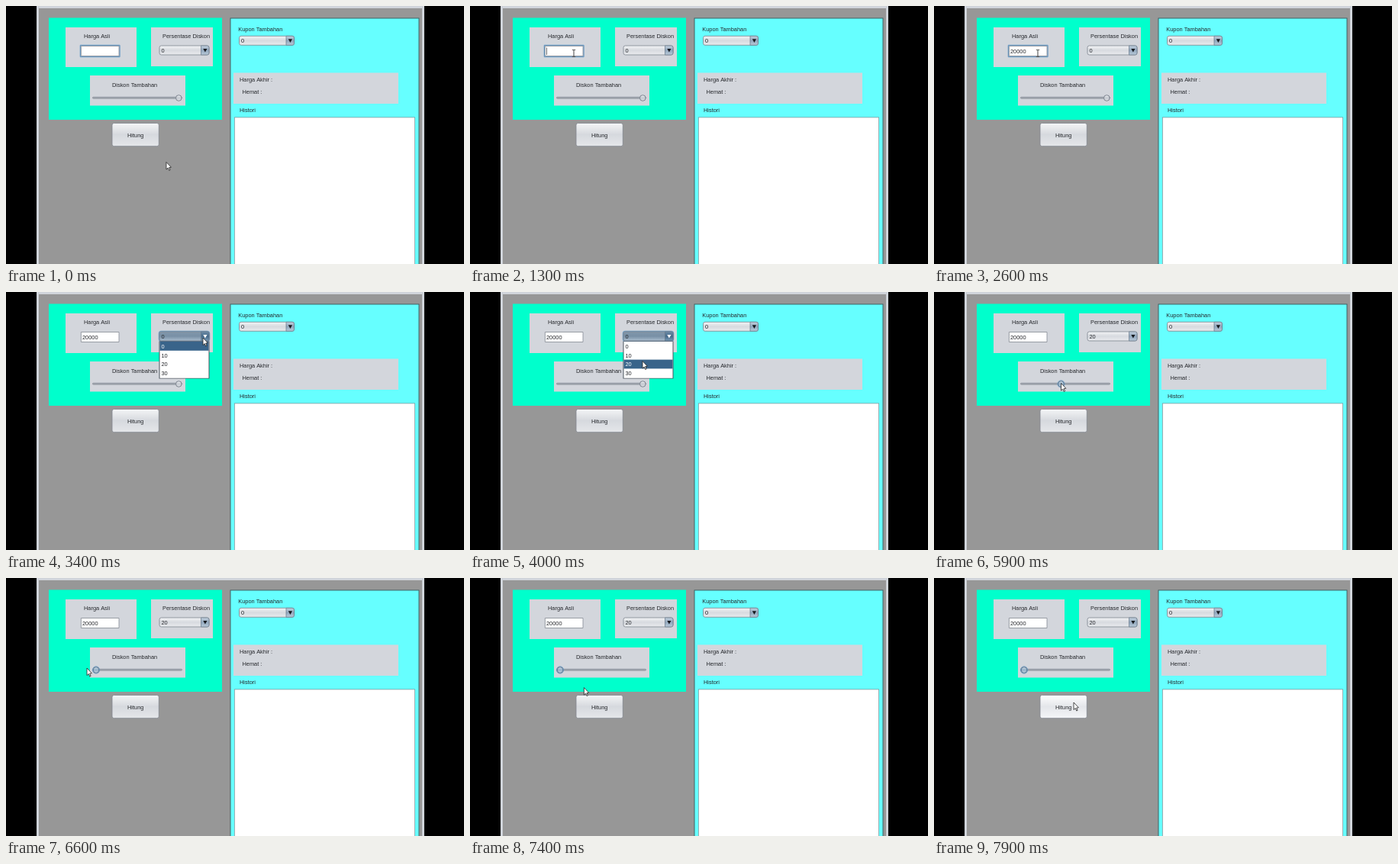
An HTML page with a canvas that plays this animation: 600x338 px, repeating every 8 s.

```html
<!DOCTYPE html>
<html lang="id">
<head>
<meta charset="utf-8">
<title>Kalkulator Diskon</title>
<style>
html, body { margin: 0; width: 100%; height: 100%; overflow: hidden; background: #000; }
canvas { display: block; }
</style>
</head>
<body>
<canvas id="stage" width="600" height="338"></canvas>
<script>
const ctx = document.getElementById('stage').getContext('2d');
const LOOP = 8000, PANEL = '#d3d6dc', INK = '#25272b', FOCUS = '#6c9cc4';

// Pointer path: [time, x, y]
const path = [
  [0, 210, 204.5], [100, 210, 204.5], [400, 156, 138], [700, 88, 64], [800, 109, 68],
  [900, 109, 68], [1200, 139, 62], [1300, 136, 62], [2700, 136, 62],
  [3100, 258, 60], [3600, 258, 60], [3900, 231, 100], [4000, 226, 90.5],
  [4500, 226, 90.5], [5000, 195, 125], [5100, 197, 121], [5300, 197, 121],
  [5600, 226, 119], [6200, 107, 120], [6600, 106, 118], [6900, 106, 118],
  [7800, 184, 164], [7900, 183, 163], [LOOP, 183, 163]
];

function pointerAt(t) {
  const i = path.findIndex(p => p[0] > t);
  const a = path[i - 1], b = path[i], k = (t - a[0]) / (b[0] - a[0]);
  return { x: a[1] + (b[1] - a[1]) * k, y: a[2] + (b[2] - a[2]) * k };
}

function rect(x, y, w, h, fill) {
  ctx.fillStyle = fill;
  ctx.fillRect(x, y, w, h);
}

function text(s, x, y, fill = INK) {
  ctx.font = '7.4px "Liberation Sans", Arial, sans-serif';
  ctx.fillStyle = fill;
  ctx.fillText(s, x, y);
}

function shade(y, h, ...colors) {
  const g = ctx.createLinearGradient(0, y, 0, y + h);
  colors.forEach((c, i) => g.addColorStop(i / (colors.length - 1), c));
  return g;
}

function box(x, y, w, h, r, fill, stroke, line = 0.8) {
  ctx.beginPath();
  ctx.roundRect(x, y, w, h, r);
  if (fill) { ctx.fillStyle = fill; ctx.fill(); }
  ctx.strokeStyle = stroke;
  ctx.lineWidth = line;
  ctx.stroke();
}

function combo(x, y, w, value, focused, open) {
  const h = 12, split = x + w - 10.5;
  if (focused) box(x - 0.6, y - 0.6, w + 1.2, h + 1.2, 3, null, FOCUS, 1.3);
  const body = open ? shade(y, h, '#8297aa', '#7890a6', '#a9bccd') : shade(y, h, '#f3f4f6', '#d7dadf', '#e9ebee');
  box(x, y, w, h, 2.5, body, '#7d838d');
  ctx.beginPath();
  ctx.roundRect(split, y, 10.5, h, [0, 2.5, 2.5, 0]);
  ctx.fillStyle = open ? shade(y, h, '#6e8da8', '#45698a', '#7698b4') : shade(y, h, '#c3d0dd', '#91a7bd', '#b9cad9');
  ctx.fill();
  ctx.strokeStyle = '#667789';
  ctx.lineWidth = 0.7;
  ctx.stroke();
  ctx.fillStyle = open ? '#fff' : '#15181c';
  ctx.beginPath();
  ctx.moveTo(split + 2.8, y + 4);
  ctx.lineTo(split + 8, y + 4);
  ctx.lineTo(split + 5.4, y + 8.6);
  ctx.fill();
  text(value, x + 2.5, y + 8.8);
}

function popup(pointer) {
  rect(200.5, 64.5, 66, 49, '#4b535c');
  rect(201.5, 65, 64, 47.8, '#fff');
  const hover = Math.max(0, Math.min(3, Math.floor((pointer.y - 65) / 11.8)));
  ['0', '10', '20', '30'].forEach((s, i) => {
    const y = 65 + i * 11.8;
    if (i === hover) rect(201.5, y, 64, 11.8, '#39648a');
    text(s, 203.5, y + 8.7, i === hover ? '#fff' : INK);
  });
}

function slider(x, focused) {
  box(113.4, 119.3, 117.2, 1.9, 1, '#a4a9b1', '#858b95', 0.7);
  if (focused) {
    ctx.beginPath();
    ctx.arc(x, 120.5, 4.6, 0, 7);
    ctx.strokeStyle = FOCUS;
    ctx.lineWidth = 1;
    ctx.stroke();
  }
  ctx.beginPath();
  ctx.arc(x, 120.5, 3.8, 0, 7);
  ctx.fillStyle = focused ? shade(116, 9, '#dde6ee', '#94b0c8', '#d2e2ee') : shade(116, 9, '#f2f3f5', '#c5cad1', '#e4e7ea');
  ctx.fill();
  ctx.strokeStyle = focused ? '#55718c' : '#737b87';
  ctx.lineWidth = 0.9;
  ctx.stroke();
}

function arrow({ x, y }) {
  ctx.beginPath();
  [[0, 0], [0, 9.6], [2.2, 7.6], [3.7, 11], [5.1, 10.4], [3.7, 7.1], [6.4, 6.8]]
    .forEach(([dx, dy]) => ctx.lineTo(x + dx, y + dy));
  ctx.closePath();
  ctx.fillStyle = '#fff';
  ctx.fill();
  ctx.strokeStyle = '#222';
  ctx.lineWidth = 0.8;
  ctx.stroke();
}

function iBeam({ x, y }) {
  rect(x - 0.5, y - 4.5, 1, 9, '#444');
  for (const dy of [-5, 4]) rect(x - 2.2, y + dy, 4.4, 0.9, '#555');
}

function draw(t) {
  const pointer = pointerAt(t);
  const fieldFocus = t < 3400, open = t >= 3400 && t < 4400;
  const typed = '20000'.slice(0, [1500, 1600, 1800, 1900, 2100].filter(k => t >= k).length);

  // Window
  rect(0, 0, 600, 338, '#000');
  rect(40, 0, 508, 338, '#d0d4da');
  rect(43, 3, 502, 335, '#979797');
  rect(56, 15.5, 227, 133.5, '#00ffcc');
  rect(293.5, 15.5, 248, 323, '#3f6265');
  rect(294.5, 16.5, 246, 322, '#66ffff');

  // Price field
  rect(78, 28, 93, 52, PANEL);
  text('Harga Asli', 102, 42);
  if (fieldFocus) box(97.4, 51.5, 51.6, 15, 0.5, null, FOCUS, 1.4);
  box(98.4, 52.5, 49.6, 13, 0, '#fff', '#858a92', 0.8);
  text(typed, 100, 62);
  const caret = (t >= 1000 && t < 2600) || (t >= 2800 && fieldFocus);
  if (caret) rect(100 + typed.length * 4.12, 54.5, 0.7, 9.5, '#333');

  // Percentage
  rect(190, 28, 81, 51, PANEL);
  text('Persentase Diskon', 205, 41.5);

  // Slider
  rect(110, 91, 125, 39.5, PANEL);
  text('Diskon Tambahan', 139, 105.5);
  const knob = t < 5600 ? 226.3 : t < 6200 ? Math.max(118, Math.min(226.3, pointer.x)) : 118;
  slider(knob, t >= 5600);

  combo(201, 52, 65, t < 4400 ? '0' : '20', t >= 3400 && t < 5600, open);
  if (open) popup(pointer);

  // Button
  const over = pointer.x > 139 && pointer.x < 200 && pointer.y > 153 && pointer.y < 184;
  box(139, 153.5, 61.3, 30.2, 2.5,
    over ? shade(153, 31, '#ffffff', '#e4e6ea', '#f5f6f8') : shade(153, 31, '#f5f6f7', '#d6d9de', '#e5e7ea'), '#80858d');
  text('Hitung', 159, 171.5);

  // Results
  text('Kupon Tambahan', 304.3, 32.7);
  combo(305.5, 39.3, 72, '0', false, false);
  rect(298, 87.5, 216, 40.5, PANEL);
  text('Harga Akhir :', 306, 98.7);
  text('Hemat :', 309.5, 115.2);
  text('Histori', 306, 139);
  rect(299, 145.5, 237, 193, '#7c9a9f');
  rect(299.8, 146.3, 235.4, 192, '#fff');

  const overField = pointer.x > 98 && pointer.x < 148 && pointer.y > 52 && pointer.y < 69;
  (overField ? iBeam : arrow)(pointer);
}

// The picture is refreshed ten times a second
function frame(now) {
  draw(Math.floor((now % LOOP) / 100) * 100);
  requestAnimationFrame(frame);
}
requestAnimationFrame(frame);
</script>
</body>
</html>
```
